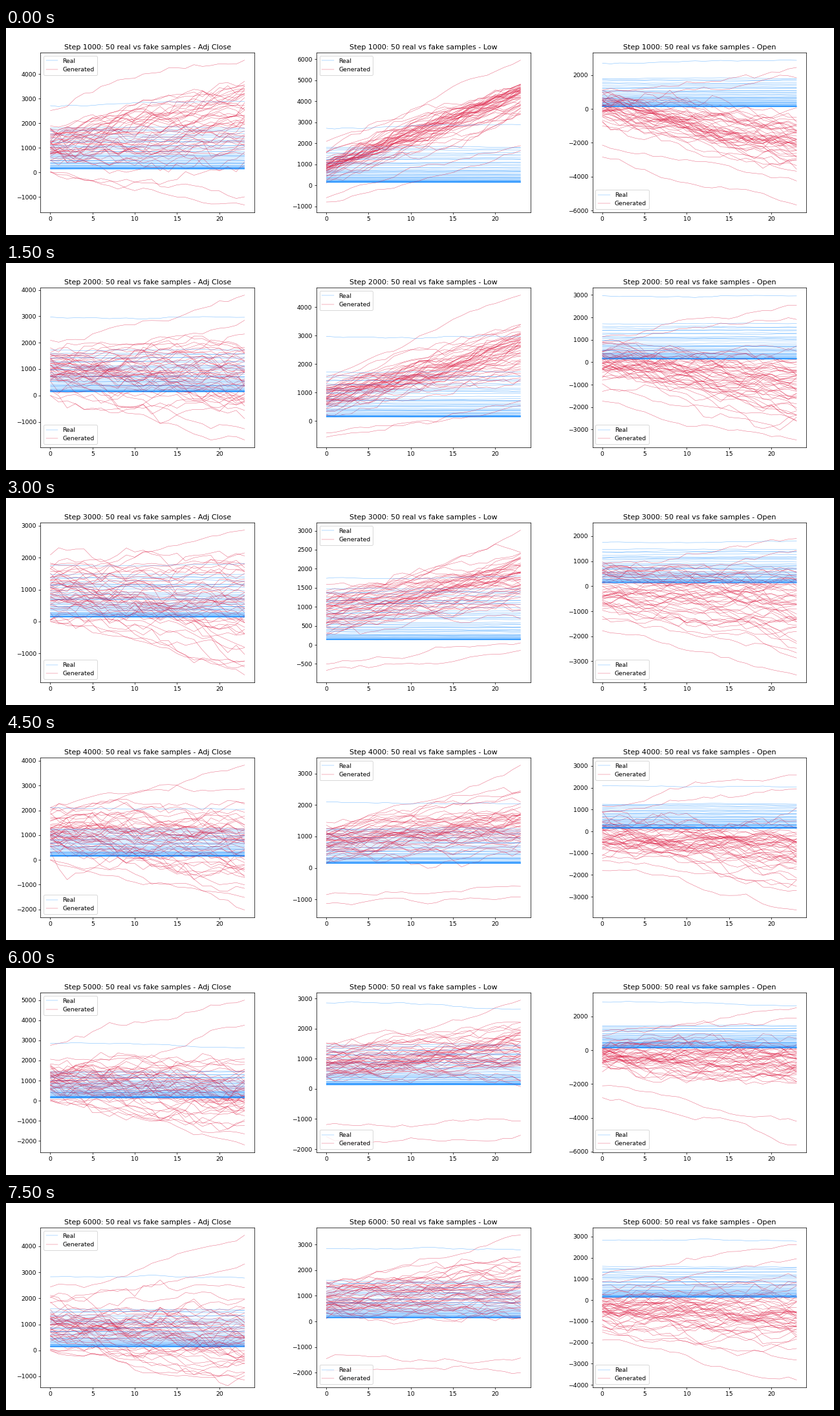
A matplotlib script that plays this animation: 1280 by 320 pixels, repeating every 8000 ms.

```python
import numpy as np
import matplotlib.pyplot as plt
from matplotlib.animation import FuncAnimation
from matplotlib.collections import LineCollection
from matplotlib.lines import Line2D

DPI = 200 / 3
INTERVAL = 500
FRAMES = 16
FRAMES_PER_STEP = 3
SAMPLES = 50
REAL, FAKE = "dodgerblue", "crimson"
STYLE = dict(linewidth=0.5, alpha=0.7)
CORNERS = {"U": "upper left", "L": "lower left"}

HOURS = np.arange(24)
PROGRESS = HOURS / HOURS[-1]

# Highest real series (first, last value) and ceiling of the others, per step.
REAL_TOP = [(2710, 2880), (2970, 2960), (1750, 1810), (2100, 2040), (2850, 2640), (2830, 2780)]
REAL_CEILING = [1820, 1700, 1480, 1270, 1470, 1580]

# start, end: mean of the generated bundle as a function of the training step.
# spread: deviation at both ends; jitter: hourly noise relative to the axis.
# origin: where the lowest and highest strays begin, relative to the data limits.
# reach: how near strays come to the upper limit; lift: how far low strays follow the trend.
COLUMNS = [
    dict(name="Adj Close", corners="ULLLUU",
         ylims=[(-1626, 4858), (-1963, 4076), (-1909, 3093),
                (-2321, 4120), (-2574, 5374), (-1418, 4711)],
         start=lambda step: 1080, end=lambda step: 450 + 1500 * np.exp(-step),
         spread=(470, 850), jitter=0.027, origin=(0, 0.55), reach=1, lift=0),
    dict(name="Low", corners="UUUULL",
         ylims=[(-1286, 6296), (-927, 4673), (-981, 3206),
                (-1573, 3507), (-2103, 3185), (-2562, 3645)],
         start=lambda step: 850, end=lambda step: 1200 + 3100 * np.exp(-0.9 * step),
         spread=(340, 540), jitter=0.018, origin=(0.85, 0.35), reach=1, lift=0.75),
    dict(name="Open", corners="LLLULL",
         ylims=[(-6107, 3324), (-3788, 3320), (-3835, 2532),
                (-3944, 3374), (-6031, 3401), (-4109, 3415)],
         start=lambda step: 100 - 100 * step, end=lambda step: -700 - 1250 * np.exp(-1.2 * step),
         spread=(500, 850), jitter=0.021, origin=(0.5, 0.45), reach=0.85, lift=0),
]


def bridges(rng, count, size):
    """Random walks that start and end at zero."""
    walk = rng.normal(0, size, (count, len(HOURS))).cumsum(axis=1)
    walk -= walk[:, :1]
    return walk - walk[:, -1:] * PROGRESS


def wander(rng, first, last, size):
    """Noisy paths from each first value to each last value."""
    first, last = np.reshape(first, (-1, 1)), np.reshape(last, (-1, 1))
    return first + (last - first) * PROGRESS + bridges(rng, len(first), size)


def real_paths(step):
    """Flat series, many of them at low, shared price levels."""
    rng = np.random.default_rng(100 + step)
    levels = 130 + (REAL_CEILING[step] - 130) * rng.permutation(np.linspace(0, 1, SAMPLES - 1)) ** 2.6
    levels = 50 * np.round(levels / 50) + rng.normal(0, 12, SAMPLES - 1)
    first, last = REAL_TOP[step]
    starts = np.append(levels, first)
    ends = np.append(levels * rng.normal(1, 0.015, SAMPLES - 1), last)
    return wander(rng, starts, ends, 0) + starts[:, None] * bridges(rng, SAMPLES, 0.006)


def fake_paths(step, column):
    """A normal bundle plus two strays towards each data limit."""
    spec = COLUMNS[column]
    rng = np.random.default_rng(10 * step + column)
    bottom, top = spec["ylims"][step]
    pad = (top - bottom) / 22
    low, high = bottom + pad, (top - pad) * spec["reach"]
    size = spec["jitter"] * (top - bottom)
    start, end = spec["start"](step), spec["end"](step)

    z0, z1 = np.clip(rng.normal(size=(2, SAMPLES - 4)), -2.2, 2.2)
    first = start + spec["spread"][0] * z0
    last = end + spec["spread"][1] * (0.3 * z0 + 0.95 * z1)
    bundle = wander(rng, first, np.clip(last, 0.85 * low, 0.9 * high), size)

    scale = np.array([1, 0.75])
    first = np.append(spec["origin"][0] * low * scale, spec["origin"][1] * high * scale)
    last = np.append(low * scale + spec["lift"] * (end - start), high * scale)
    strays = wander(rng, first, last, 0.5 * size)
    return np.vstack([bundle, np.clip(strays, low, high)])


def draw_panel(ax, step, column):
    spec = COLUMNS[column]
    ax.clear()
    segments = [np.column_stack([HOURS, path])
                for pair in zip(real_paths(step), fake_paths(step, column)) for path in pair]
    ax.add_collection(LineCollection(segments, colors=[REAL, FAKE] * SAMPLES, **STYLE),
                      autolim=False)
    ax.set(xlim=(-1.15, 24.15), ylim=spec["ylims"][step])
    ax.set_title(f"Step {1000 * (step + 1)}: {SAMPLES} real vs fake samples - {spec['name']}")
    handles = [Line2D([], [], color=color, label=label, **STYLE)
               for color, label in ((REAL, "Real"), (FAKE, "Generated"))]
    ax.legend(handles=handles, loc=CORNERS[spec["corners"][step]])


fig = plt.figure(figsize=(19.2, 4.8), dpi=DPI)
axes = [fig.add_axes([(i + 0.125) / 3, 0.11, 0.775 / 3, 0.77]) for i in range(3)]


def update(frame):
    for column, ax in enumerate(axes):
        draw_panel(ax, frame // FRAMES_PER_STEP, column)
    return axes


animation = FuncAnimation(fig, update, frames=FRAMES, interval=INTERVAL,
                          repeat=True, repeat_delay=0, blit=False)
plt.show()
```
